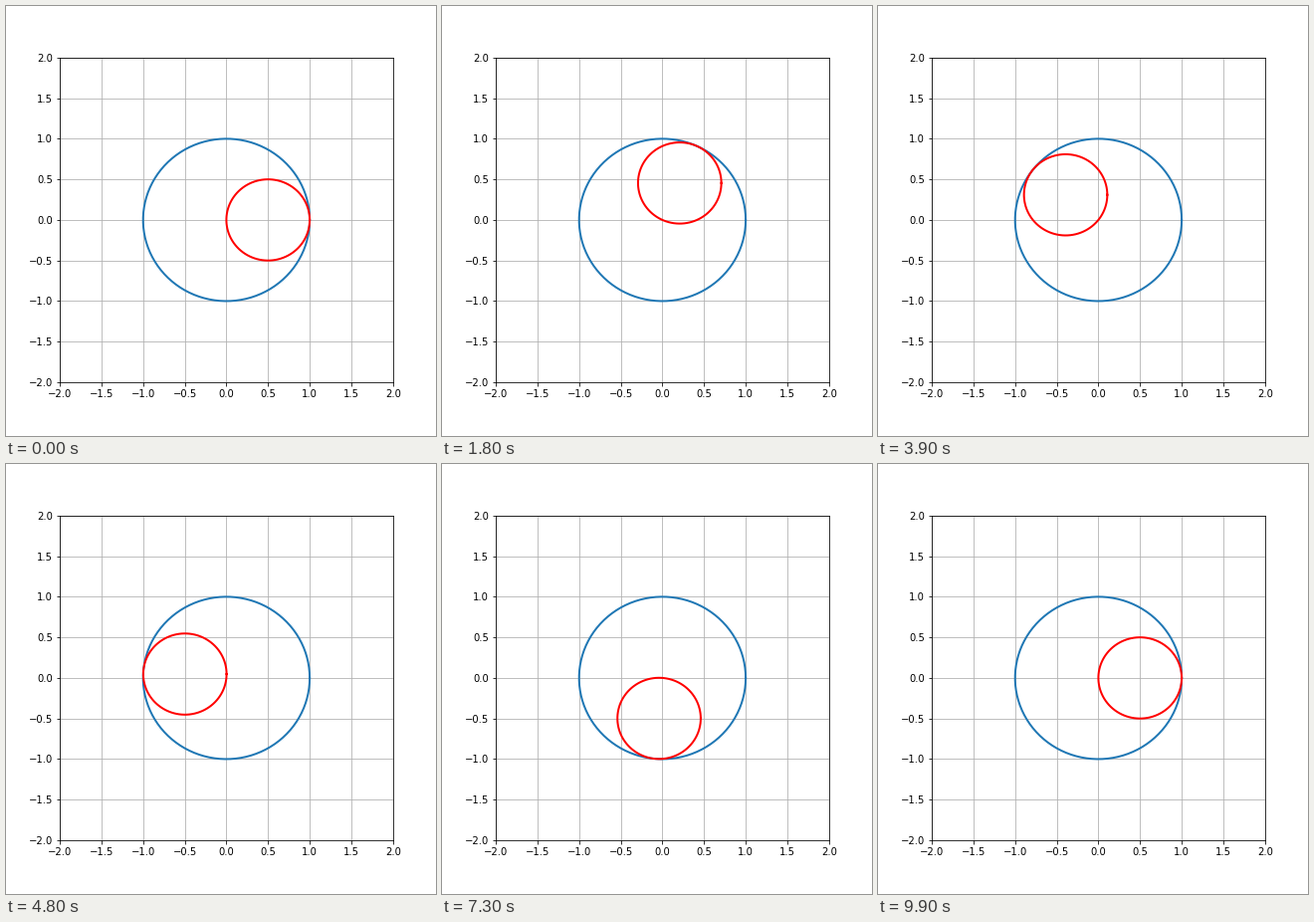
A matplotlib script for the animation above (10 s loop, 432 by 432 pixels).

```python
import numpy as np
import matplotlib.pyplot as plt
from matplotlib.animation import FuncAnimation

FRAMES = 100
INTERVAL = 100  # ms

theta = np.linspace(0, 2 * np.pi, 100)
angles = np.linspace(0, 2 * np.pi, FRAMES)


def circle(radius, cx=0.0, cy=0.0):
    return cx + radius * np.cos(theta), cy + radius * np.sin(theta)


fig, ax = plt.subplots(figsize=(6, 6), dpi=72)
fig.subplots_adjust(left=0.125, right=0.9, bottom=0.125, top=0.88)
ax.set_xlim(-2, 2)
ax.set_ylim(-2, 2)
ticks = np.arange(-2, 2.5, 0.5)
ax.set_xticks(ticks)
ax.set_yticks(ticks)
ax.grid(True)

ax.plot(*circle(1), color="C0", lw=2)
(inner,) = ax.plot(*circle(0.5, 0.5), color="red", lw=2)


def update(i):
    # The inner circle rolls around inside the outer one.
    a = angles[i]
    inner.set_data(*circle(0.5, 0.5 * np.cos(a), 0.5 * np.sin(a)))
    return (inner,)


anim = FuncAnimation(fig, update, frames=FRAMES, interval=INTERVAL,
                     repeat=True, repeat_delay=0)
plt.show()
```
